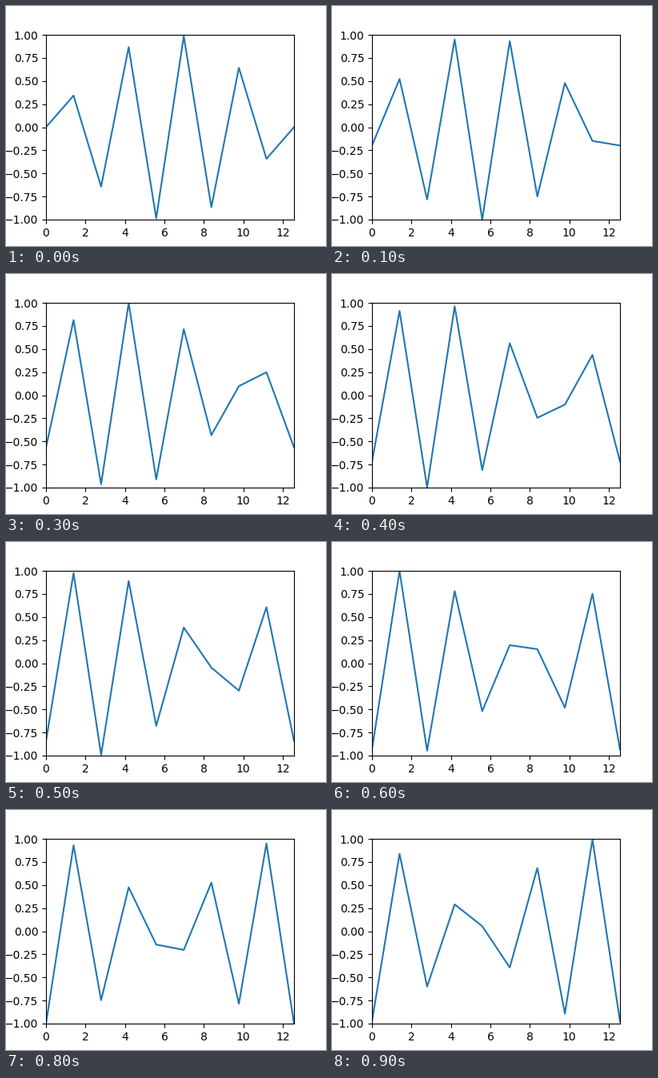
A matplotlib script for the animation above (1 s loop, 400x300 px).

```python
import numpy as np
import matplotlib.pyplot as plt
from matplotlib.animation import FuncAnimation

FRAMES = 10
INTERVAL = 100  # ms
X_MAX = 4 * np.pi

fig, ax = plt.subplots(figsize=(4, 3), dpi=100)
ax.set_xlim(0, X_MAX)
ax.set_ylim(-1, 1)

# Ten coarse samples turn the travelling sine into a zigzag.
x = np.linspace(0, X_MAX, 10)
line, = ax.plot(x, np.sin(2 * x))


def update(frame):
    line.set_ydata(np.sin(2 * (x - 0.1 * frame)))
    return line,


anim = FuncAnimation(fig, update, frames=FRAMES, interval=INTERVAL,
                     repeat=True, repeat_delay=0, blit=False)
plt.show()
```
